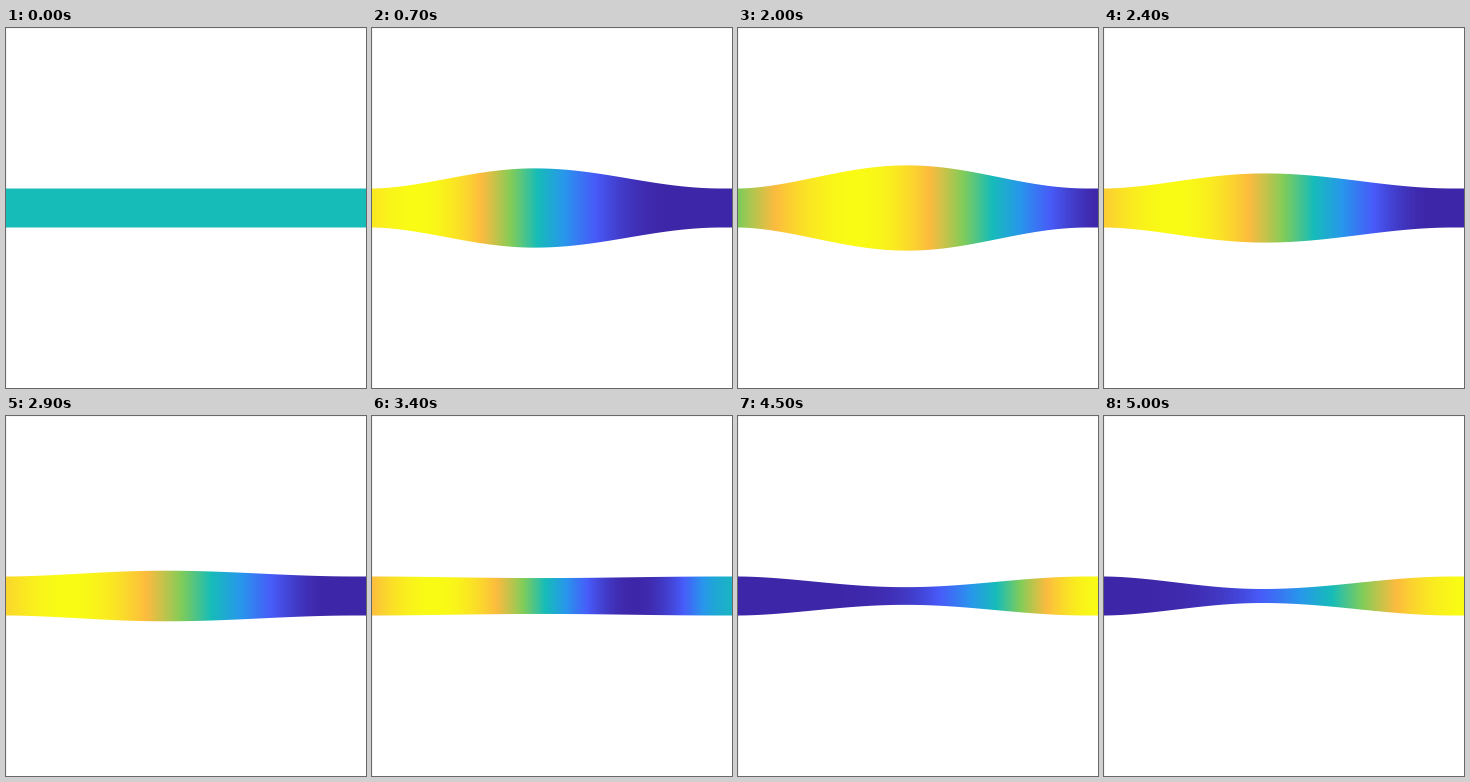
Animation of 360x360 px, one loop 5100 ms. Source, as an HTML page with a canvas:

```html
<!DOCTYPE html>
<html lang="en">
<head>
<meta charset="utf-8">
<title>Pressure in an elastic tube</title>
<style>
  html, body { margin: 0; width: 100%; height: 100%; overflow: hidden; background: #fff; }
  canvas { display: block; width: 100vw; height: 100vh; }
</style>
</head>
<body>
<canvas id="stage" width="360" height="360"></canvas>
<script>
const ctx = document.getElementById('stage').getContext('2d');
const SIZE = 360, MID = 180, LOOP = 5100, STEP = 100;
const REST = 19.5, PEAK = 54, PEAK_TIME = 1200;
const TUBE_END = 350, CREST_TIME = 1500, CREST_REACH = 255;
const REVERSAL = 2900, BACKFLOW = 3900;

// Colours from low to high pressure, evenly spaced
const RAMP = [
  [62, 38, 168], [71, 91, 249], [39, 151, 235], [22, 188, 184],
  [129, 204, 89], [252, 187, 62], [249, 251, 21]
];

const clamp = k => Math.max(0, Math.min(1, k));
const mix = (a, b, k) => a + (b - a) * k;
const ease = k => (1 - Math.cos(Math.PI * clamp(k))) / 2;

function rampColor(v) {
  const p = clamp(v) * (RAMP.length - 1);
  const i = Math.min(RAMP.length - 2, Math.floor(p));
  return `rgb(${RAMP[i].map((c, n) => Math.round(mix(c, RAMP[i + 1][n], p - i)))})`;
}

// Half height at the apex: steady swelling, then a slow collapse
function apexHeight(t) {
  if (t < PEAK_TIME) return mix(REST, PEAK, t / PEAK_TIME);
  return 5 + (PEAK - 5) * Math.exp(-(((t - PEAK_TIME) / 1840) ** 1.6));
}

function outline(t) {
  const height = apexHeight(t);
  const apex = 167 + 9 * Math.cos(2 * Math.PI * (t - CREST_TIME) / 2400);
  return x => {
    const bulge = x < apex
      ? ease(x / apex) ** 0.88
      : ease((TUBE_END - x) / (TUBE_END - apex));
    return mix(REST, height, bulge);
  };
}

// A pressure crest that visits the middle of the tube and returns to the inlet
function forwardFlow(t) {
  const rising = t < CREST_TIME;
  const home = rising ? 42 : 62;
  const spread = rising ? 400 : 515;
  const crest = mix(home, 205, Math.exp(-(((t - CREST_TIME) / spread) ** 2)));
  const fall = 0.7 + 0.8 * Math.exp(-t / 1200);
  return x => ease(1 - Math.abs(x - crest) / CREST_REACH) ** (x < crest ? 0.7 : fall);
}

// Pressure building up at the outlet and spreading back
function backFlow(t) {
  const k = clamp((t - BACKFLOW) / (LOOP - STEP - BACKFLOW));
  const low = mix(130, 15, k), sharpness = mix(2.5, 1.7, k);
  return x => ease((x - low) / (365 - low)) ** sharpness;
}

// Pressure per column, scaled to the full colour range
function pressures(t) {
  if (t === 0) return new Array(SIZE).fill(0.5);
  const forward = forwardFlow(t), back = backFlow(t);
  const turn = ease((t - REVERSAL) / 1150);
  const values = Array.from({ length: SIZE }, (_, x) => mix(forward(x), back(x), turn));
  const min = Math.min(...values), max = Math.max(...values);
  return values.map(v => (v - min) / (max - min));
}

function draw(t) {
  ctx.fillStyle = '#fff';
  ctx.fillRect(0, 0, SIZE, SIZE);
  ctx.fillStyle = '#f4f4f4';
  ctx.fillRect(0, 0, SIZE, 1);
  ctx.fillRect(0, 0, 1, SIZE);

  const halfHeight = outline(t);
  pressures(t).forEach((v, x) => {
    const half = halfHeight(x + 0.5);
    ctx.fillStyle = rampColor(v);
    ctx.fillRect(x, MID - half, 1, half * 2);
  });
}

const start = performance.now();
function frame() {
  const t = (performance.now() - start) % LOOP;
  draw(Math.floor(t / STEP) * STEP);
  requestAnimationFrame(frame);
}
frame();
</script>
</body>
</html>
```
